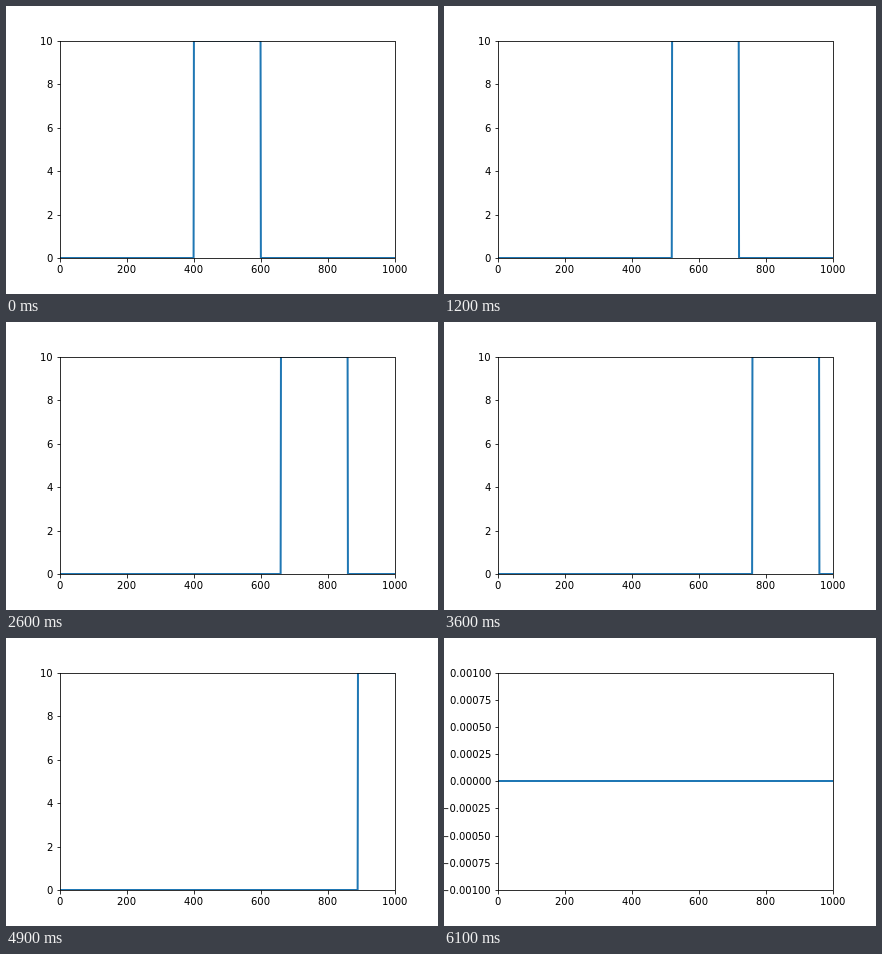
These frames come from a looping animation (432 by 288 pixels, 10000 ms). An HTML page with a canvas:

```html
<!DOCTYPE html>
<html lang="en">
<head>
<meta charset="utf-8">
<title>Moving pulse</title>
<style>
  html, body { margin: 0; width: 100%; height: 100%; overflow: hidden; background: #fff; }
  canvas { display: block; }
</style>
</head>
<body>
<canvas id="plot" width="432" height="288"></canvas>
<script>
const ctx = document.getElementById('plot').getContext('2d');
const LOOP = 10000, STEP = 100, LAST = 61;
const LEFT = 54, RIGHT = 388.8, TOP = 34.56, BOTTOM = 252;
const X_MAX = 1000, PEAK = 10;

const snap = v => Math.floor(v + 0.5) + 0.5;
const toX = x => LEFT + (RIGHT - LEFT) * x / X_MAX;
const toY = (y, lo, hi) => BOTTOM - (BOTTOM - TOP) * (y - lo) / (hi - lo);

function segment(x1, y1, x2, y2) {
  ctx.beginPath();
  ctx.moveTo(x1, y1);
  ctx.lineTo(x2, y2);
  ctx.stroke();
}

function drawCurve(start, flat) {
  ctx.save();
  ctx.beginPath();
  ctx.rect(54, 35, 335, 217);
  ctx.clip();
  ctx.strokeStyle = '#1f77b4';
  ctx.lineWidth = 2;
  ctx.lineJoin = 'round';
  ctx.lineCap = 'square';
  if (flat) {
    segment(LEFT, 143, RIGHT, 143);
  } else {
    ctx.beginPath();
    for (let x = 0; x <= X_MAX; x++) {
      const y = x >= start && x < start + 200 ? PEAK : 0;
      ctx.lineTo(toX(x), toY(y, 0, PEAK));
    }
    ctx.stroke();
  }
  ctx.restore();
}

function drawAxes(flat) {
  ctx.strokeStyle = ctx.fillStyle = '#000';
  ctx.lineWidth = 0.8;
  ctx.font = '10px "DejaVu Sans", sans-serif';

  for (let x = 0; x <= X_MAX; x += 200) {
    const px = toX(x), width = ctx.measureText(x).width;
    segment(snap(px), 252.5, snap(px), 256.5);
    ctx.fillText(x, Math.round(px - width / 2), 267);
  }

  const lo = flat ? -0.001 : 0, hi = flat ? 0.001 : PEAK;
  const count = flat ? 8 : 5;
  for (let i = 0; i <= count; i++) {
    const y = lo + (hi - lo) * i / count, py = toY(y, lo, hi);
    const digits = Math.abs(y).toFixed(flat ? 5 : 0);
    const label = (flat && i < count / 2 ? '\u2212' : '') + digits;
    segment(51.5, snap(py), 54.5, snap(py));
    ctx.fillText(label, Math.round(47 - ctx.measureText(label).width), Math.round(py + 4));
  }

  ctx.strokeRect(snap(LEFT), snap(TOP), snap(RIGHT) - snap(LEFT), snap(BOTTOM) - snap(TOP));
}

const begin = performance.now();

function draw() {
  const time = (performance.now() - begin) % LOOP;
  const step = Math.min(Math.floor(time / STEP), LAST);
  const flat = step === LAST;
  ctx.fillStyle = '#fff';
  ctx.fillRect(0, 0, 432, 288);
  drawCurve(400 + 10 * step, flat);
  drawAxes(flat);
  requestAnimationFrame(draw);
}
draw();
</script>
</body>
</html>
```
